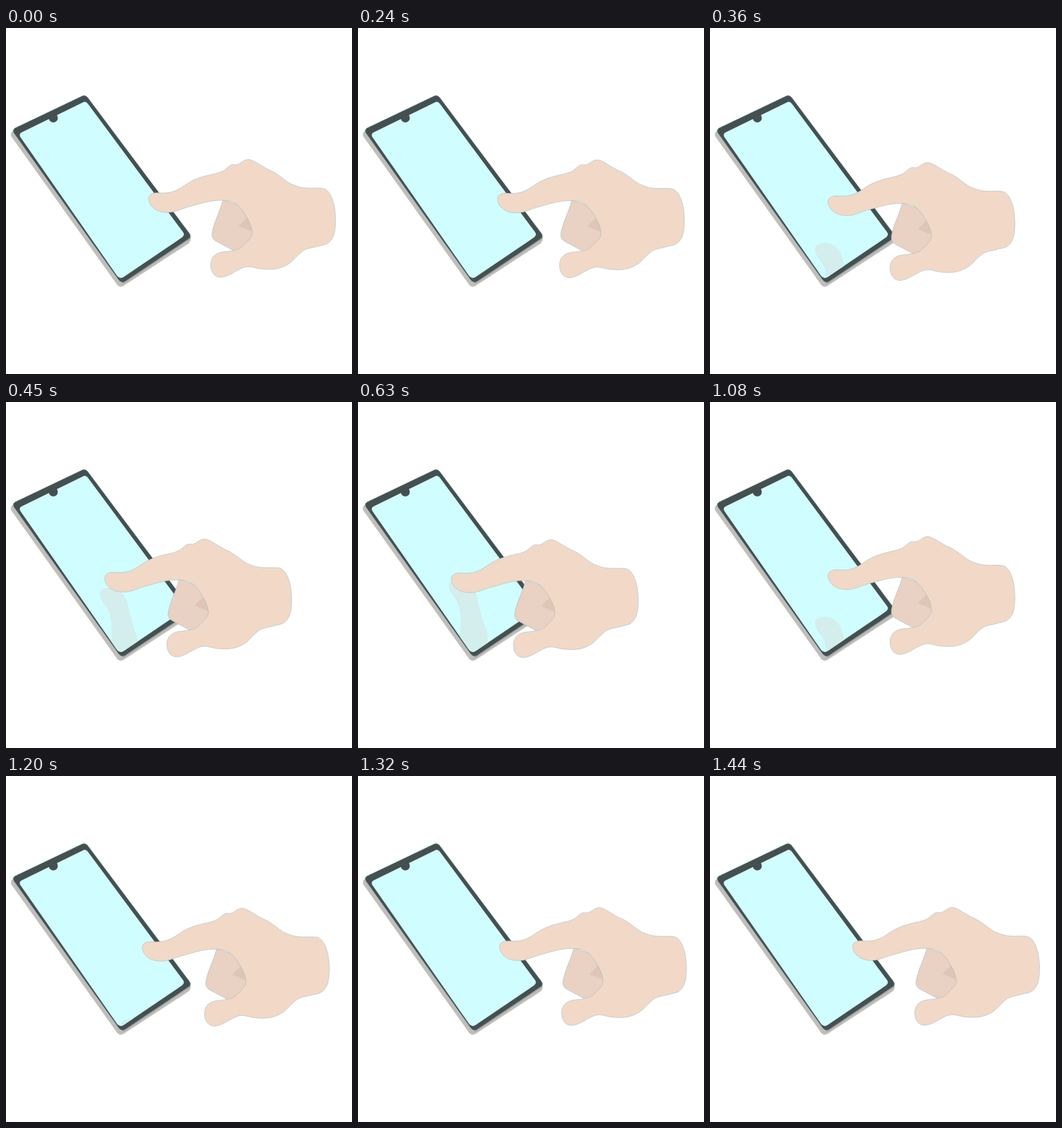
Animation, 512 px wide and 512 px high, one loop 1.47 s. Source, as an HTML page:

```html
<!DOCTYPE html>
<html lang="en">
<head>
<meta charset="utf-8">
<title>Tapping a phone</title>
<style>
  html, body { margin: 0; width: 100%; height: 100%; overflow: hidden; background: #fff; }
  svg { display: block; width: 100vw; height: 100vh; }
</style>
</head>
<body>
<svg viewBox="0 0 512 512">
  <defs>
    <path id="glass" d="M23 154.500 L113 110.500 Q118 107 121.500 112.500 L262 302 Q265 306 261 309.500 L174 368.500 Q169 372 164.500 367 L21 161 Q19 156.500 23 154.500Z"/>
    <clipPath id="screen"><use href="#glass"/></clipPath>
  </defs>

  <!-- phone -->
  <path fill="#c0beba" d="M12 151 Q6 154 7.500 160 L164.500 380 Q168 385 174 381.500 L270 319 Q274 316 273 308 L172 374Z"/>
  <path fill="#a5a5a2" d="M172 376 L273 309 L273 312 L173 379Z"/>
  <path fill="#464f50" stroke="#4b9292" stroke-width=".5" d="M13.500 148 L112 101 Q117 98 121 103 L271.500 304 Q275 309 270 312 L176 375 Q171 378 167 373 L11.500 155 Q9.500 150 13.500 148Z"/>
  <use href="#glass" fill="#d0fdff"/>
  <circle cx="70" cy="133" r="6.700" fill="#464f50"/>

  <g clip-path="url(#screen)">
    <path id="reflection" fill="#d3eeed" d="M139 284 C139 278 146 275 154 275 C166 275 175 283 179 295 C184 312 186 330 196 352 L200 400 L150 400 C157 370 159 325 153 312 C150 303 140 296 139 284Z"/>
  </g>

  <g id="hand" stroke="#8fbab8" stroke-width=".5" stroke-linejoin="round">
    <path fill="#e9d1c3" d="M321 254 C318 268 310 282 306 298 C304 306 304 311 310 315 L338 330 L352 326 L368 305 L352 265Z"/>
    <path fill="#dfc5b7" stroke="none" d="M344 293 L357 280 L368 303Z"/>
    <path fill="#f2d8c7" d="M211 253 C211 245 219 243 228 244 C246 245 254 240 267 231
      C290 216 309 218 322 211 C328 207 332 201 337 202 C347 204 349 194 360 194.500
      C368 196 380 206 392 211 C406 217 414 229 428 233 C442 239 454 236 466 237
      C478 237 483 251 486 264 C488 278 489 293 485 307 C481 316 476 321 465 322
      C454 326 445 325 438 331 C427 340 424 347 413 352 C401 359 381 358 369 355
      C361 353 356 352 348 356 C337 361 329 368 318 369 C307 369 302 359 303 347
      C305 337 312 332 323 331 C341 329 346 328 352 321 C360 314 366 308 364 300
      C363 290 356 279 350 270 C341 258 332 255 319 255 C300 255 285 261 269 265
      C256 269 250 273 239 273 C221 273 212 263 211 253Z"/>
  </g>
</svg>
<script>
  const LOOP = 1470, STEP = 30;
  const hand = document.getElementById('hand');
  const reflection = document.getElementById('reflection');

  // Symmetric cubic-bezier(a, 0, 1 - a, 1), solved by bisection.
  function ease(x, a) {
    if (x <= 0) return 0;
    if (x >= 1) return 1;
    let low = 0, high = 1, s;
    for (let i = 0; i < 24; i++) {
      s = (low + high) / 2;
      const r = 1 - s;
      if (3 * a * s * r * r + 3 * (1 - a) * s * s * r + s * s * s < x) low = s;
      else high = s;
    }
    return s * s * (3 - 2 * s);
  }

  const move = (node, x, y) => node.setAttribute('transform', `translate(${x} ${y})`);

  function draw(now) {
    const t = Math.floor((now % LOOP) / STEP) * STEP;
    const reach = ease((t - 105) / 510, 0.74) - ease((t - 720) / 720, 0.716);
    move(hand, -73 * reach, 9.2 * reach);
    const away = 0.887 - reach;
    move(reflection, 42 * away, 111 * away);
  }

  const start = performance.now();
  function tick() {
    draw(performance.now() - start);
    requestAnimationFrame(tick);
  }
  tick();
</script>
</body>
</html>
```
